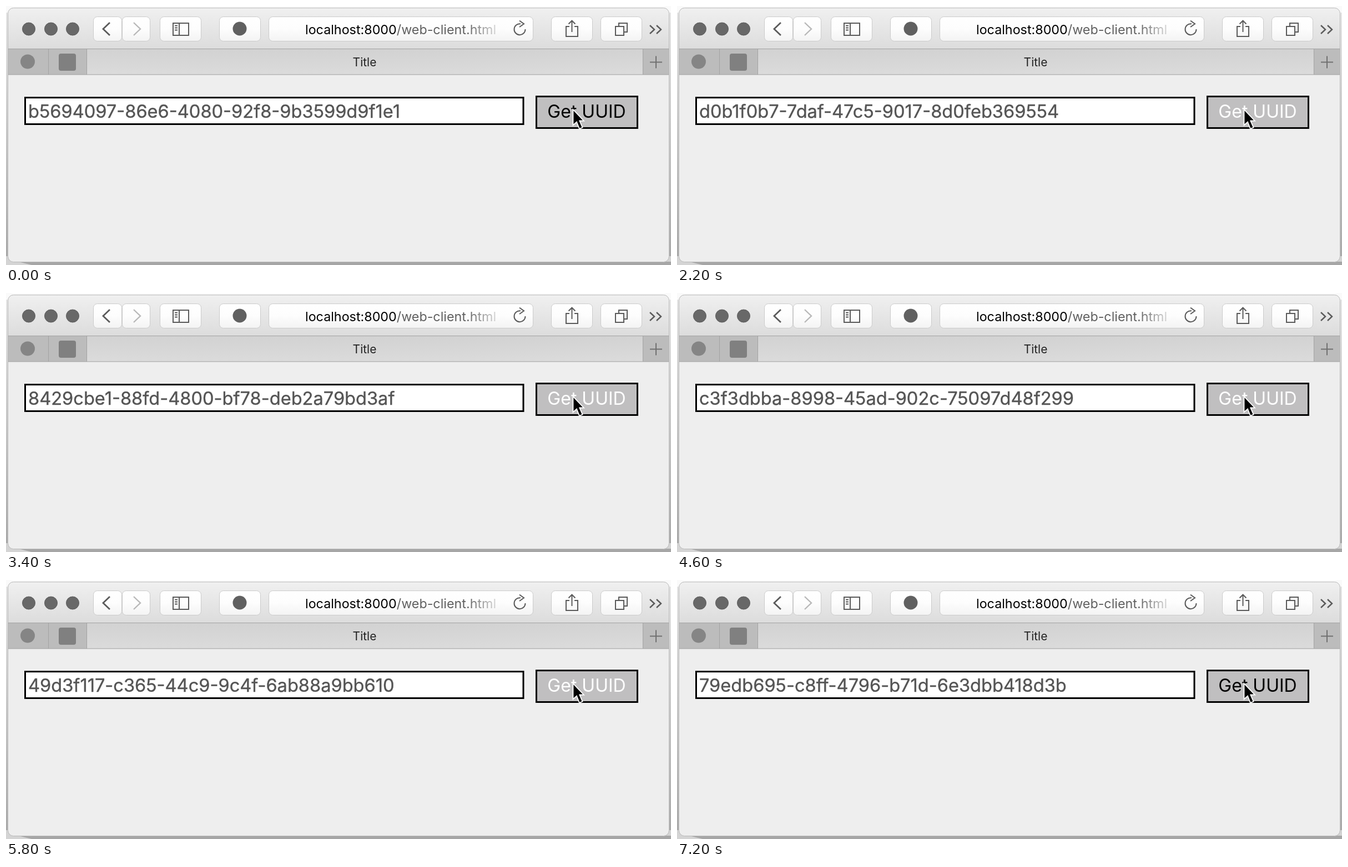
Animation of 1198 by 468 pixels, one loop 8 s. Source, as an HTML page:

```html
<!DOCTYPE html>
<html lang="en">
<head>
<meta charset="utf-8">
<title>Get UUID</title>
<style>
  html, body { margin: 0; width: 100%; height: 100%; overflow: hidden; background: #fafafa; }
  svg { display: block; width: 1198px; height: 468px; }
  text { font-family: Inter, "Open Sans", sans-serif; }
  .keys rect { fill: url(#key); stroke: #cbcbcb; }
  .icons { fill: none; stroke: #5a5a5a; stroke-width: 2; }
  .field { fill: #fff; stroke: #000; stroke-width: 3; }
  #uuid { fill: #555; stroke: #555; stroke-width: .4; }
</style>
</head>
<body>
<svg viewBox="0 0 1198 468">
  <defs>
    <linearGradient id="bar" x2="0" y2="1"><stop stop-color="#f0f0f0"/><stop offset="1" stop-color="#dcdcdc"/></linearGradient>
    <linearGradient id="tab" x2="0" y2="1"><stop stop-color="#d2d2d2"/><stop offset="1" stop-color="#dbdbdb"/></linearGradient>
    <linearGradient id="key" x2="0" y2="1"><stop stop-color="#fff"/><stop offset=".5" stop-color="#fdfdfd"/><stop offset="1" stop-color="#f3f3f3"/></linearGradient>
    <linearGradient id="path" gradientUnits="userSpaceOnUse" x1="830" x2="889"><stop stop-color="#606060"/><stop offset="1" stop-color="#606060" stop-opacity=".15"/></linearGradient>
    <linearGradient id="shade" x2="0" y2="1"><stop stop-color="#e6e6e6"/><stop offset="1" stop-color="#a8a8a8"/></linearGradient>
    <clipPath id="frame"><rect x="4" y="3" width="1190" height="460" rx="10"/></clipPath>
    <clipPath id="address"><rect x="474" y="20" width="414" height="44"/></clipPath>
  </defs>

  <!-- window and its shadow -->
  <path d="M0 12h4v456H0zM1194 12h4v456h-4z" fill="url(#shade)"/>
  <path d="M0 452h1198v16H0z" fill="#d4d4d4"/>
  <path d="M22 462H1198v6H46z" fill="#a6a6a6"/>
  <g clip-path="url(#frame)">
    <rect width="1198" height="468" fill="#eee"/>
    <rect y="3" width="1198" height="75" fill="url(#bar)"/>
    <rect y="78" width="1198" height="46" fill="#bcbcbc"/>
    <rect x="146" y="78" width="1001" height="46" fill="url(#tab)"/>
    <path d="M0 77.5h1198M76.5 78v46M145.5 78v46M1147.5 78v46" stroke="#a3a3a3"/>
    <path d="M0 124h1198" stroke="#a0a0a0"/>
  </g>
  <rect x="3.5" y="3.5" width="1191" height="459" rx="10" fill="none" stroke="#b9b9b9"/>

  <!-- toolbar -->
  <g fill="#686868" stroke="#5c5c5c">
    <circle cx="41" cy="41.5" r="11.5"/><circle cx="81" cy="41.5" r="11.5"/><circle cx="120" cy="41.5" r="11.5"/>
  </g>
  <g class="keys">
    <rect x="157.5" y="19.5" width="51" height="44" rx="7"/>
    <rect x="209.5" y="19.5" width="50" height="44" rx="7"/>
    <rect x="277.5" y="19.5" width="74" height="44" rx="7"/>
    <rect x="384.5" y="19.5" width="74" height="44" rx="7"/>
    <rect x="473.5" y="19.5" width="476" height="44" rx="7"/>
    <rect x="982.5" y="19.5" width="74" height="44" rx="7"/>
    <rect x="1071.5" y="19.5" width="74" height="44" rx="7"/>
  </g>
  <g class="icons">
    <path d="M187 30L175 41.5L187 53" stroke-width="2.8"/>
    <path d="M230 30L242 41.5L230 53" stroke="#b8b8b8" stroke-width="2.4"/>
    <path d="M301 31h28v22h-28zM312 31v22M304 35.5h5M304 39.5h5M304 43.5h5"/>
    <path d="M927 32.3A10 10 0 1 0 935.5 42M925 26.500l8 5.800l-8 5.700"/>
    <path d="M1015 37h-6v18h21V37h-6M1019.5 47V27M1013.5 32.5l6-6l6 6"/>
    <path d="M1104 37v-6h15v16h-6M1098 37h15v16h-15z"/>
    <path d="M1160 35l8 7.5l-8 7.5M1172 35l8 7.5l-8 7.5" stroke-width="2.4"/>
    <path d="M1160 101.5h22M1171 90.5v22" stroke="#707070"/>
  </g>
  <circle cx="421" cy="41" r="12.5" fill="#606060"/>
  <circle cx="39" cy="100.5" r="13" fill="#858585"/>
  <rect x="95" y="86" width="31" height="31" rx="4" fill="#808080"/>

  <g font-size="23.3" clip-path="url(#address)">
    <text x="539" y="51"><tspan>localhost:8000</tspan><tspan fill="url(#path)">/web-client.html</tspan></text>
  </g>
  <text x="646" y="109" font-size="21" text-anchor="middle" fill="#222">Title</text>

  <!-- page -->
  <rect class="field" x="34.5" y="165.5" width="897.5" height="48"/>
  <text id="uuid" x="40" y="202" font-size="32.6"></text>
  <rect class="field" x="955.5" y="163.5" width="182" height="57" style="fill:#c0bfc0"/>
  <text id="label" x="1046" y="202" font-size="32" text-anchor="middle">Get UUID</text>
  <path d="M1021.5 187v28.5l6.500-6l5 12.500l5.500-2.500l-5.200-12h7.700z" stroke="#fff" stroke-width="1.8"/>
</svg>
<script>
  const ids = [
    "b5694097-86e6-4080-92f8-9b3599d9f1e1",
    "d0b1f0b7-7daf-47c5-9017-8d0feb369554",
    "8429cbe1-88fd-4800-bf78-deb2a79bd3af",
    "c3f3dbba-8998-45ad-902c-75097d48f299",
    "49d3f117-c365-44c9-9c4f-6ab88a9bb610",
    "e27c04d8-5b1a-4f63-a94e-3d80f6c257b9",
    "79edb695-c8ff-4796-b71d-6e3dbb418d3b"
  ];
  const LOOP = 8000, CYCLE = 1200, PRESS = 1000;
  const uuid = document.getElementById("uuid");
  const label = document.getElementById("label");
  const start = performance.now();

  // Each cycle ends with a press; its release brings the next id.
  function draw() {
    const t = (performance.now() - start) % LOOP;
    uuid.textContent = ids[Math.floor(t / CYCLE)];
    label.setAttribute("fill", t % CYCLE < PRESS ? "#000" : "#fff");
    requestAnimationFrame(draw);
  }
  draw();
</script>
</body>
</html>
```
